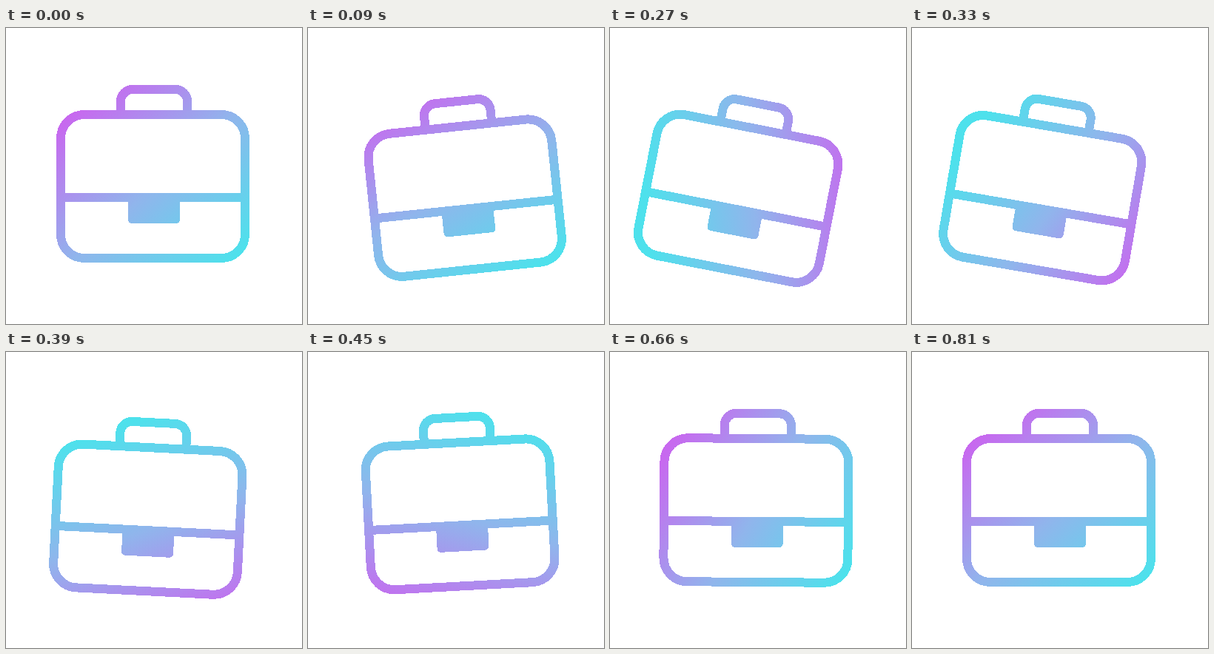
Animation of 400x400 px, one loop 1840 ms. Source, as an HTML page:

```html
<!DOCTYPE html>
<html lang="en">
<head>
<meta charset="utf-8">
<title>Briefcase</title>
<style>
  html, body { margin: 0; width: 100%; height: 100%; overflow: hidden; background: #fff; }
  svg { display: block; width: 100%; height: 100%; }
</style>
</head>
<body>
<svg viewBox="0 0 400 400" shape-rendering="crispEdges">
  <defs>
    <linearGradient id="tint" gradientUnits="userSpaceOnUse" x1="-145" y1="0" x2="145" y2="0">
      <stop offset="0" stop-color="#c769ef"/>
      <stop offset=".5" stop-color="#90b5ec"/>
      <stop offset="1" stop-color="#4ee1ec"/>
    </linearGradient>
  </defs>
  <g id="bag" fill="none" stroke="url(#tint)" stroke-width="12">
    <path d="M155 117V99a16 16 0 0 1 16-16H229a16 16 0 0 1 16 16V117"/>
    <rect x="74" y="117" width="249" height="194" rx="32"/>
    <path d="M74 229H323"/>
    <path d="M165 229H235V259a5 5 0 0 1-5 5H170a5 5 0 0 1-5-5Z" fill="url(#tint)" stroke="none"/>
  </g>
</svg>
<script>
  const LOOP = 1840, STEP = 30, END = 810;
  const bag = document.getElementById('bag');
  const tint = document.getElementById('tint');

  const ease = u => (1 - Math.cos(Math.PI * u)) / 2;

  // Ease from one [ms, value] pose to the next, then hold the last
  function pose(keys, t) {
    const i = keys.findIndex(([time]) => time > t);
    if (i < 0) return keys[keys.length - 1][1];
    const [t0, v0] = keys[i - 1], [t1, v1] = keys[i];
    return v0 + (v1 - v0) * ease((t - t0) / (t1 - t0));
  }

  const SWING = [[0, 0], [150, -9.1], [285, 11.7], [480, -4], [595, 2], [720, -0.9], [END, 0]];
  const DROP = [[0, 0], [120, 19], [290, 19], [540, 0]];

  // One full turn of the gradient, quick in the middle
  const spin = u => 48 + 360 * (1 - (1 - u ** 1.8) ** 2.6);

  function draw(now) {
    const t = Math.min(END, Math.floor((now % LOOP) / STEP) * STEP);
    const drop = pose(DROP, t);
    bag.setAttribute('transform', `translate(0 ${drop}) rotate(${pose(SWING, t)} 200 82)`);
    tint.setAttribute('gradientTransform',
      `translate(200 214) rotate(${spin(t / END)}) translate(${-drop} 0)`);
  }

  const start = performance.now();
  function tick() {
    draw(performance.now() - start);
    requestAnimationFrame(tick);
  }
  tick();
</script>
</body>
</html>
```
